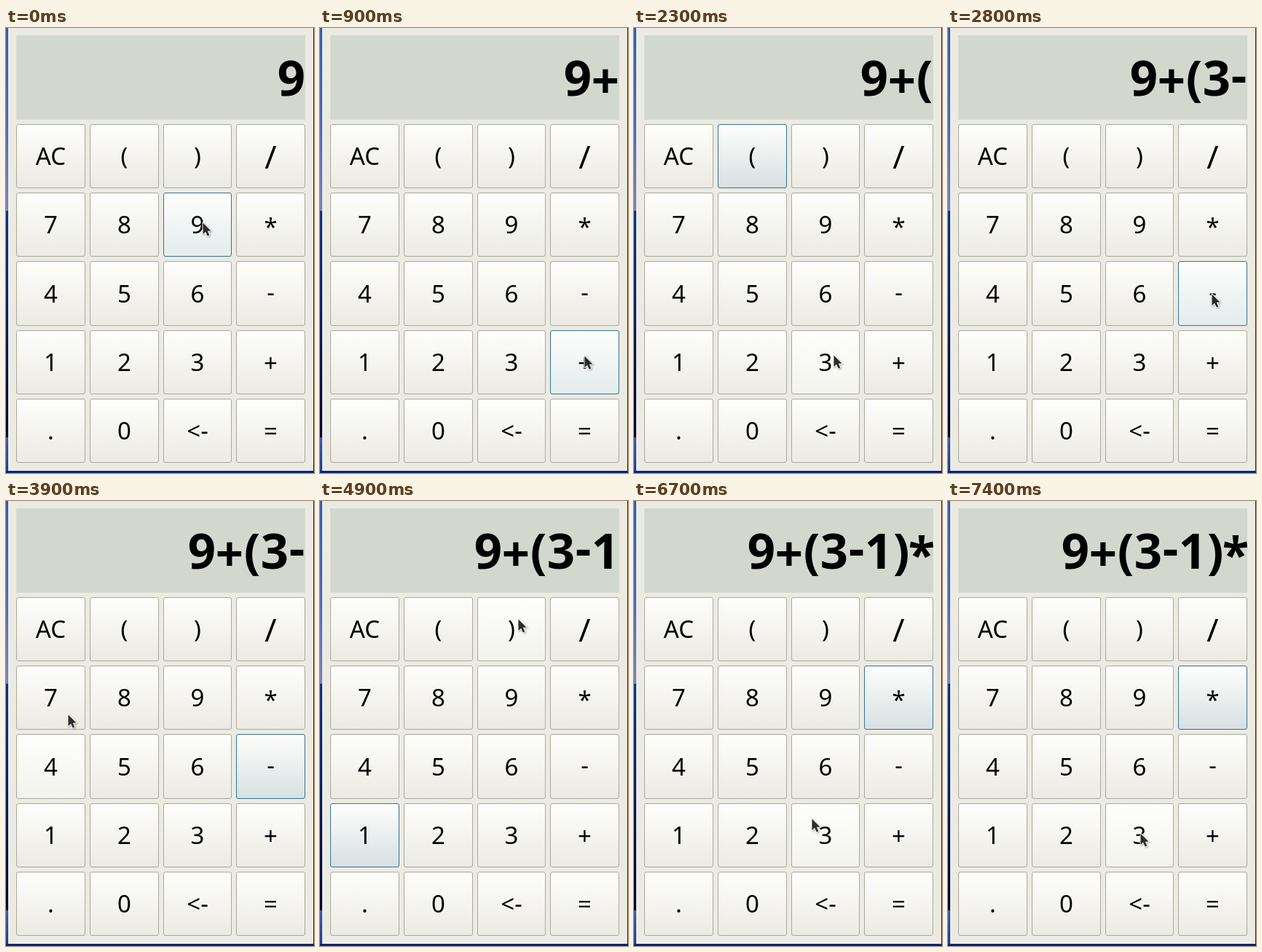
Write an HTML page with a canvas that moves like this. It is 423 by 611 pixels and loops after 8000 ms.

```html
<!DOCTYPE html>
<html lang="en">
<head>
<meta charset="utf-8">
<title>Calculator</title>
<style>
html, body { margin: 0; width: 100%; height: 100%; overflow: hidden; background: #ecebe3; }
canvas { display: block; }
</style>
</head>
<body>
<canvas id="stage" width="423" height="611"></canvas>
<script>
const ctx = document.getElementById('stage').getContext('2d');
const LOOP = 8000, STEP = 100;
const FONT = '"Noto Sans", "Open Sans", sans-serif';
const LABELS = 'AC ( ) / 7 8 9 * 4 5 6 - 1 2 3 + . 0 <- ='.split(' ');

const BUTTONS = LABELS.map((label, i) => {
  const left = 14 + (i % 4) * 100.75, top = 132 + (i >> 2) * 94.2;
  const x = Math.round(left), y = Math.round(top);
  return { label, x, y, w: Math.round(left + 94.75) - x, h: Math.round(top + 88.2) - y };
});

// Symbol metrics: baseline shift in em, cell width in the display
const SHIFT = { '*': 0.08, '-': -0.06, '+': 0.045 };
const CELL = { '(': 24, ')': 24, '-': 23, '*': 32 };

// The pointer rests at each stop, and presses its key one step before leaving
const STOPS = [
  { x: 270, y: 267, arrive: 0, leave: 100, key: '9' },
  { x: 363, y: 450, arrive: 700, leave: 900, key: '+' },
  { x: 161, y: 173, arrive: 1700, leave: 1900, key: '(' },
  { x: 274, y: 449, arrive: 2300, leave: 2500, key: '3' },
  { x: 362, y: 365, arrive: 2600, leave: 2800, key: '-' },
  { x: 228, y: 190, arrive: 3500, leave: 3600 },
  { x: 85, y: 293, arrive: 3900, leave: 3900 },
  { x: 64, y: 450, arrive: 4100, leave: 4400, key: '1' },
  { x: 272, y: 162, arrive: 4900, leave: 5200, key: ')' },
  { x: 358, y: 261, arrive: 6000, leave: 6400, key: '*' },
  { x: 243, y: 435, arrive: 6500, leave: 6600 },
  { x: 264, y: 456, arrive: 7400, leave: LOOP }
];

const smooth = u => u * u * (3 - 2 * u);

function pointerAt(t) {
  const i = STOPS.findIndex(s => t <= s.leave);
  const to = STOPS[i], from = STOPS[i - 1] || to;
  const k = t >= to.arrive ? 1 : smooth((t - from.leave) / (to.arrive - from.leave));
  const mix = axis => Math.round(from[axis] + (to[axis] - from[axis]) * k);
  return { x: mix('x'), y: mix('y') };
}

function vertical(y0, y1, ...colors) {
  const g = ctx.createLinearGradient(0, y0, 0, y1);
  colors.forEach((c, i) => g.addColorStop(i / (colors.length - 1), c));
  return g;
}

function rect(fill, x, y, w, h) {
  ctx.fillStyle = fill;
  ctx.fillRect(x, y, w, h);
}

function drawBackdrop() {
  rect('#06267c', 0, 0, 423, 611);
  rect(vertical(0, 251, '#345dac', '#4a69b2', '#7b83bd'), 0, 0, 3, 251);
  rect(vertical(251, 562, '#0a3584', '#041d60', '#000028'), 0, 251, 3, 311);
  rect(vertical(562, 608, '#4059a8', '#1c3f94'), 0, 562, 3, 46);
  rect('#ecebe3', 3, 0, 419, 608);
}

function drawDisplay(text) {
  ctx.save();
  ctx.beginPath();
  ctx.rect(14, 10, 397, 116);
  ctx.clip();
  rect('#d3d8cf', 14, 10, 397, 116);
  ctx.fillStyle = '#000';
  ctx.font = `bold 67px ${FONT}`;
  let right = 411;
  for (const ch of [...text].reverse()) {
    const w = CELL[ch] || 38;
    ctx.fillText(ch, right - w / 2, 93 + 67 * (SHIFT[ch] || 0));
    right -= w;
  }
  ctx.restore();
}

function drawButton({ label, x, y, w, h }, focused, hovered) {
  const bottom = focused ? (hovered ? '#e2ecec' : '#d7e0e1') : (hovered ? '#f3f3ed' : '#ebeae3');
  ctx.beginPath();
  ctx.roundRect(x + 0.5, y + 0.5, w - 1, h - 1, 2.5);
  ctx.fillStyle = vertical(y, y + h, '#fefefc', bottom);
  ctx.fill();
  ctx.lineWidth = 1;
  ctx.strokeStyle = focused ? '#33729c' : '#aaa99b';
  ctx.stroke();

  const tall = label === '/';
  const size = tall ? 44 : 33;
  const baseline = Math.round(y + h / 2) + (tall ? 17 : 12);
  ctx.fillStyle = '#000';
  ctx.font = `${size}px ${FONT}`;
  ctx.fillText(label, x + w / 2, baseline + size * (SHIFT[label] || 0));
}

function drawPointer({ x, y }) {
  ctx.save();
  ctx.translate(x + 0.5, y + 0.5);
  ctx.beginPath();
  [[0, 0], [0, 15.5], [3.6, 12.2], [6.2, 18], [8.8, 16.9], [6.3, 11.2], [11, 11]]
    .forEach(([px, py]) => ctx.lineTo(px, py));
  ctx.closePath();
  ctx.shadowColor = 'rgba(0,0,0,0.3)';
  ctx.shadowBlur = 2;
  ctx.shadowOffsetX = ctx.shadowOffsetY = 1;
  ctx.lineWidth = 2;
  ctx.lineJoin = 'round';
  ctx.strokeStyle = '#f4f4f2';
  ctx.stroke();
  ctx.shadowColor = 'transparent';
  ctx.fillStyle = '#2b2b2b';
  ctx.fill();
  ctx.restore();
}

const contains = (b, p) => p.x >= b.x && p.x < b.x + b.w && p.y >= b.y && p.y < b.y + b.h;

function draw(now) {
  const t = Math.floor((now % LOOP) / STEP) * STEP;
  const text = STOPS.filter(s => s.key && t >= s.leave - STEP).map(s => s.key).join('');
  // The drawn pointer trails the hover highlight by one step
  const hover = pointerAt(t + STEP);

  ctx.textAlign = 'center';
  drawBackdrop();
  drawDisplay(text);
  for (const b of BUTTONS) drawButton(b, b.label === text.at(-1), contains(b, hover));
  drawPointer(pointerAt(t));
}

const start = performance.now();
function tick() {
  draw(performance.now() - start);
  requestAnimationFrame(tick);
}
tick();
</script>
</body>
</html>
```
